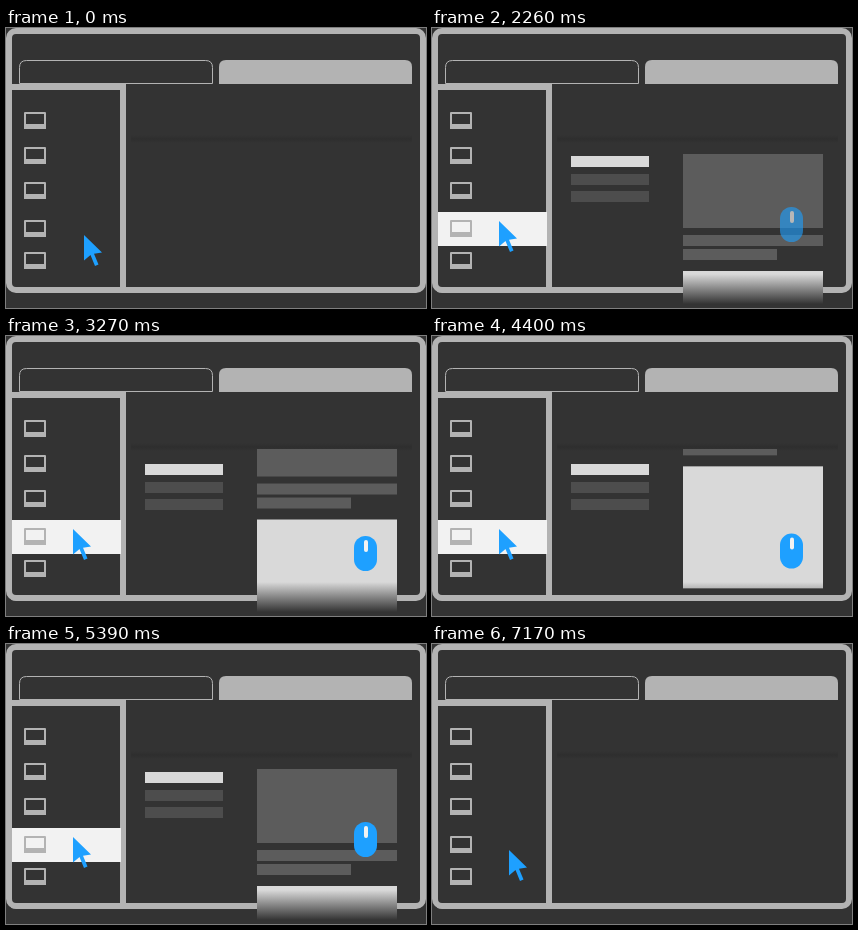
These frames come from a looping animation (420x280 px, 7.94 s). An HTML page:

```html
<!DOCTYPE html>
<html lang="en">
<head>
<meta charset="utf-8">
<title>Select and scroll</title>
<style>
html, body { margin: 0; width: 100%; height: 100%; overflow: hidden; background: #333; }
svg { display: block; width: 100%; height: 100%; }
</style>
</head>
<body>
<svg viewBox="0 0 420 280">
  <defs>
    <linearGradient id="fade" gradientUnits="userSpaceOnUse" x1="0" y1="246" x2="0" y2="276">
      <stop offset="0" stop-color="#d9d9d9"/>
      <stop offset="1" stop-color="#333"/>
    </linearGradient>
    <linearGradient id="shade" x1="0" y1="0" x2="0" y2="1">
      <stop offset="0" stop-color="#2e2e2e" stop-opacity="0"/>
      <stop offset=".5" stop-color="#2e2e2e"/>
      <stop offset="1" stop-color="#2e2e2e" stop-opacity="0"/>
    </linearGradient>
    <clipPath id="view"><rect x="251" y="113" width="140" height="163"/></clipPath>
    <path id="laptop" fill="#b3b3b3" fill-rule="evenodd"
      d="M1 0H21Q22 0 22 1V17H0V1Q0 0 1 0ZM2 2V12H20V2Z"/>
  </defs>

  <rect width="420" height="280" fill="#333"/>
  <rect x="3" y="3" width="414" height="259" rx="7" fill="none" stroke="#b3b3b3" stroke-width="6"/>
  <path d="M13.5 55.5V39.5Q13.5 32.5 20.5 32.5H199.5Q206.5 32.5 206.5 39.5V55.5Z" fill="none" stroke="#b3b3b3"/>
  <path d="M213 56V39Q213 32 220 32H399Q406 32 406 39V56Z" fill="#b3b3b3"/>
  <path d="M3 56H120V262H114V62H3Z" fill="#b3b3b3"/>
  <rect x="125" y="107" width="281" height="8" fill="url(#shade)"/>

  <rect id="row" x="6" y="184" width="109" height="34" fill="#f2f2f2"/>
  <g id="icons"></g>

  <g id="page">
    <rect x="139" y="128" width="78" height="11" fill="#d9d9d9"/>
    <rect x="139" y="146" width="78" height="11" fill="#4d4d4d"/>
    <rect x="139" y="163" width="78" height="11" fill="#4d4d4d"/>
    <g clip-path="url(#view)">
      <g id="top" fill="#5c5c5c">
        <rect x="251" y="126" width="140" height="74"/>
        <rect x="251" y="207" width="140" height="11"/>
        <rect x="251" y="221" width="94" height="11"/>
      </g>
      <rect id="card" x="251" width="140" height="122" fill="url(#fade)"/>
    </g>
  </g>

  <g id="mouse">
    <rect x="348" width="23" height="35" rx="11.5" fill="#1ea0ff"/>
    <rect x="358" y="4" width="4" height="12" rx="2" fill="#f2f2f2"/>
  </g>
  <path id="cursor" fill="#1ea0ff" d="M0 0V25.5L6.5 20L11 31L14.5 29.5L10 18.8L18 17.5Z"/>
</svg>
<script>
const LOOP = 7940;
const el = id => document.getElementById(id);
const row = el('row'), page = el('page'), topPart = el('top'), card = el('card');
const mouse = el('mouse'), cursor = el('cursor');

el('icons').innerHTML = [84, 119, 154, 192, 224]
  .map(y => `<use href="#laptop" x="18" y="${y}"/>`).join('');

const span = (t, a, b) => Math.min(1, Math.max(0, (t - a) / (b - a)));
const mix = (a, b, k) => a + (b - a) * k;
const sine = k => (1 - Math.cos(Math.PI * k)) / 2;
const easeOut = k => 1 - (1 - k) ** 2;
const move = (node, x, y) => node.setAttribute('transform', `translate(${x.toFixed(2)} ${y.toFixed(2)})`);

function scrollAt(t) {
  if (t < 4370) return 114.5 * span(t, 2670, 3600) ** 1.5;
  const k = span(t, 4370, 5390);
  return mix(114.5, 1, (k + sine(k)) / 2);
}

function mouseAt(t) {
  if (t < 4370) return mix(179, 200, sine(span(t, 2670, 3270)));
  return mix(200, 178, easeOut(span(t, 4340, 5390)));
}

function draw(t) {
  const left = 1 - span(t, 5790, 6680);
  row.setAttribute('opacity', span(t, 530, 890) * left);
  page.setAttribute('opacity', span(t, 1130, 1490) * left);
  mouse.setAttribute('opacity', span(t, 1930, 2470) * left);

  const s = scrollAt(t);
  move(topPart, 0, -s);
  card.setAttribute('y', 243 - s);
  move(mouse, 0, mouseAt(t));

  const go = sine(span(t, 0, 330)), back = sine(span(t, 6600, 7170));
  move(cursor, mix(78, 67, go) + 10 * back, mix(207, 193, go) + 13 * back);
}

const start = performance.now();
function tick() {
  draw((performance.now() - start) % LOOP);
  requestAnimationFrame(tick);
}
tick();
</script>
</body>
</html>
```
